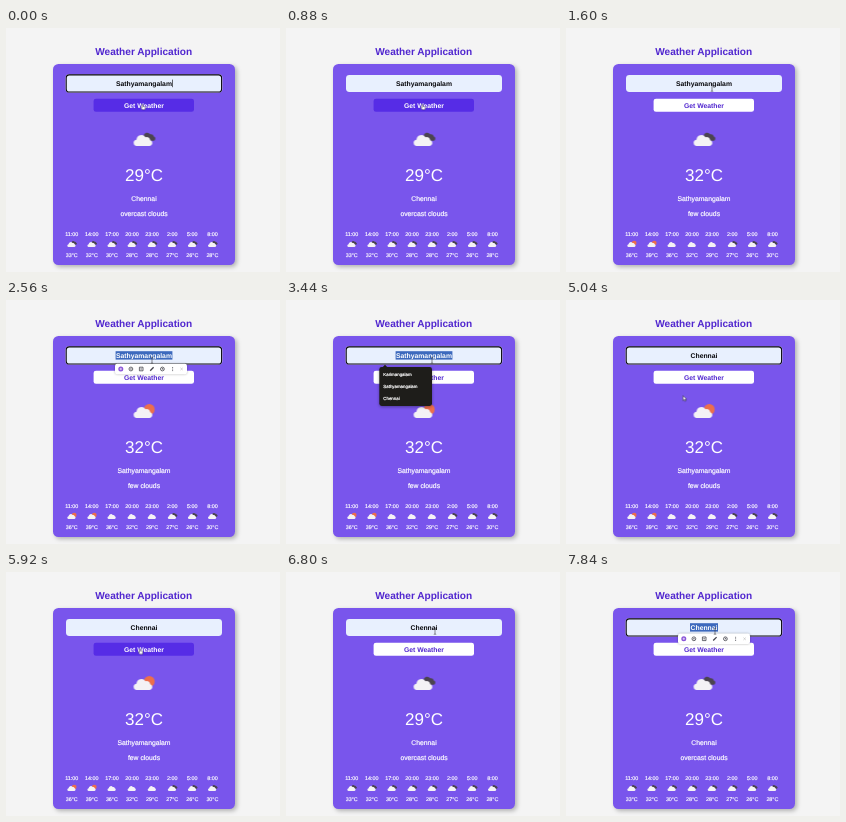
An HTML page for the animation above (8000 ms loop, 274x244 px).

```html
<!DOCTYPE html>
<html lang="en">
<head>
<meta charset="utf-8">
<title>Weather Application</title>
<style>
html, body { margin: 0; width: 100%; height: 100%; overflow: hidden; background: #f4f4f4; }
svg { display: block; width: 274px; height: 244px; }
text { font-family: "Liberation Sans", Arial, sans-serif; text-rendering: geometricPrecision; }
.mid { text-anchor: middle; }
.bold { font-weight: bold; }
.card { fill: #7955ec; filter: drop-shadow(2.5px 2.5px 2.2px rgba(0,0,0,.27)); }
.field { fill: #e8f0fe; }
.info, .hour, .items { fill: #fff; stroke: #fff; stroke-width: .2; }
.info { font-size: 6.8px; }
.hour { font-size: 5.4px; }
.items { font-size: 4.4px; }

/* Timeline: 1% = 80ms */
.step { animation: 8s step-end infinite; }
.ring { animation-name: ring; }
.caret { animation-name: caret; }
.blank { animation-name: blank; }
.first { animation-name: first; }
.second { animation-name: second; }
.hint-a { animation-name: hintA; }
.hint-b { animation-name: hintB; }
.pick-a { animation-name: pickA; }
.pick-b { animation-name: pickB; }
.bar-a { animation-name: barA; }
.bar-b { animation-name: barB; }
.menu { animation-name: menu; }
.row { animation-name: row; }
.chennai { animation-name: chennai; }
.sathy { animation-name: sathy; }
.dark { animation-name: dark; }
.sunny { animation-name: sunny; }
.hand { animation-name: hand; }
.beam { animation-name: beam; }
.arrow { animation-name: arrow; }
.btn { animation: btn 8s linear infinite; }
.label { animation: label 8s linear infinite; }
.cursor { animation: move 8s ease-in-out infinite; }

@keyframes ring { 0% {opacity:1} 4% {opacity:0} 25% {opacity:1} 69% {opacity:0} 88%, 100% {opacity:1} }
@keyframes caret { 0% {opacity:1} 4%, 100% {opacity:0} }
@keyframes blank { 0% {opacity:0} 45.5% {opacity:1} 50%, 100% {opacity:0} }
@keyframes first { 0% {opacity:1} 45.5%, 100% {opacity:0} }
@keyframes second { 0% {opacity:0} 58.5%, 100% {opacity:1} }
@keyframes hintA { 0% {opacity:0} 50% {opacity:1} 56%, 100% {opacity:0} }
@keyframes hintB { 0% {opacity:0} 56% {opacity:1} 58.5%, 100% {opacity:0} }
@keyframes pickA { 0% {opacity:0} 28% {opacity:1} 45.5%, 100% {opacity:0} }
@keyframes pickB { 0% {opacity:0} 90%, 100% {opacity:1} }
@keyframes barA { 0% {opacity:0} 30.5% {opacity:1} 41%, 100% {opacity:0} }
@keyframes barB { 0% {opacity:0} 93%, 100% {opacity:1} }
@keyframes menu { 0% {opacity:0} 43% {opacity:1} 58.5%, 100% {opacity:0} }
@keyframes row { 0% {opacity:0} 50% {opacity:1; transform:none} 56%, 100% {opacity:1; transform:translateY(12px)} }
@keyframes chennai { 0% {opacity:1} 12.5% {opacity:0} 74.5%, 100% {opacity:1} }
@keyframes sathy { 0% {opacity:0} 12.5% {opacity:1} 74.5%, 100% {opacity:0} }
@keyframes dark { 0% {opacity:1} 21% {opacity:0} 76%, 100% {opacity:1} }
@keyframes sunny { 0% {opacity:0} 21% {opacity:1} 76%, 100% {opacity:0} }
@keyframes hand { 0% {opacity:1} 17.5% {opacity:0} 50% {opacity:1} 58.5% {opacity:0} 67.5% {opacity:1} 81%, 100% {opacity:0} }
@keyframes beam { 0% {opacity:0} 18.5% {opacity:1} 47% {opacity:0} 83%, 100% {opacity:1} }
@keyframes arrow { 0% {opacity:0} 17.5% {opacity:1} 18.5% {opacity:0} 47% {opacity:1} 50% {opacity:0} 58.5% {opacity:1} 67.5% {opacity:0} 81% {opacity:1} 83%, 100% {opacity:0} }
@keyframes btn { 0%, 16.3% {fill:#562ce6} 20%, 67.3% {fill:#fff} 71%, 79.8% {fill:#562ce6} 83.6%, 100% {fill:#fff} }
@keyframes label { 0%, 16.3% {fill:#fff} 20%, 67.3% {fill:#5127cf} 71%, 79.8% {fill:#fff} 83.6%, 100% {fill:#5127cf} }
@keyframes move {
  0%, 15% {transform:translate(136.5px,76.5px)}
  19.5%, 45.5% {transform:translate(146px,60px)}
  50%, 54% {transform:translate(126.5px,83.5px)}
  57.5%, 65.5% {transform:translate(117px,96.5px)}
  68.5%, 79% {transform:translate(134px,77px)}
  85%, 100% {transform:translate(149px,59px)}
}
</style>
</head>
<body>
<svg viewBox="0 0 274 244">
  <defs>
    <path id="puff" d="M3.6 15A3.2 3.2 0 0 1 4 8.7A5 5 0 0 1 13 6.2A4.2 4.2 0 0 1 17.8 9.2A3 3 0 0 1 17.4 15Z"/>
    <g id="cloud"><use href="#puff" fill="#f4f2f5"/></g>
    <g id="overcast">
      <use href="#puff" fill="#4b4450" transform="translate(8 -1.4) scale(.75)"/>
      <use href="#cloud"/>
    </g>
    <g id="sun">
      <circle cx="16.8" cy="6.4" r="5.4" fill="#ec6e4c"/>
      <use href="#cloud"/>
    </g>
    <g id="bar">
      <rect width="72" height="10.4" rx="2.2" fill="#fff" style="filter:drop-shadow(0 .7px 1px rgba(0,0,0,.3))"/>
      <circle cx="5.8" cy="5.2" r="2.5" fill="#8a55d8"/>
      <path d="M4.6 5.2h2.4M5.8 4v2.4" stroke="#fff" stroke-width=".6"/>
      <g fill="none" stroke="#45454c" stroke-width=".8">
        <circle cx="15.9" cy="5.2" r="1.9"/><path d="M15 5.2h1.8"/>
        <path d="M24.4 3.4h3.6v3.6h-3.6zM25.3 5.2h1.8"/>
        <path d="M35.2 6.9l3.4-3.4" stroke-width="1.3"/>
        <circle cx="47.4" cy="5.2" r="1.9"/><path d="M47.4 4.2v1.2h1"/>
        <path d="M57.6 3.2v.9M57.6 4.8v.9M57.6 6.4v.9"/>
        <path d="M65.4 4l2.4 2.4M67.8 4l-2.4 2.4" stroke="#aaa" stroke-width=".5"/>
      </g>
    </g>
  </defs>

  <rect width="274" height="244" fill="#f4f4f4"/>
  <text class="mid bold" x="137.7" y="27.3" font-size="10.1" fill="#5127cf">Weather Application</text>
  <rect class="card" x="47" y="36" width="182" height="201" rx="5.5"/>

  <rect class="field" x="60" y="47" width="156" height="17" rx="3.4"/>
  <rect class="step blank" x="60" y="47" width="156" height="17" rx="3.4" fill="#fff"/>
  <g class="step ring" fill="none">
    <rect x="59.7" y="46.4" width="156.4" height="18.1" rx="3.4" stroke="#fff" stroke-width=".6"/>
    <rect x="60.2" y="46.9" width="155.4" height="17.1" rx="3.1" stroke="#08080c" stroke-width="1.1"/>
  </g>
  <g class="mid bold" font-size="6.8" fill="#08080c">
    <text class="step first" x="138" y="57.8">Sathyamangalam</text>
    <text class="step second" x="138" y="57.8">Chennai</text>
  </g>
  <path class="step caret" d="M166.4 51.6v7.6" stroke="#111" stroke-width=".7"/>
  <g class="mid" font-size="4.7" fill="#08080c" stroke="#08080c" stroke-width=".15">
    <text class="step hint-a" x="138" y="57.6">Sathyamangalam</text>
    <text class="step hint-b" x="138" y="57.6">Chennai</text>
  </g>
  <g class="mid bold" font-size="6.8">
    <g class="step pick-a">
      <rect x="109.6" y="51.2" width="56.8" height="8.4" fill="#3c69bd"/>
      <text x="138" y="57.8" fill="#fff">Sathyamangalam</text>
    </g>
    <g class="step pick-b">
      <rect x="124" y="51.2" width="28" height="8.4" fill="#3c69bd"/>
      <text x="138" y="57.8" fill="#fff">Chennai</text>
    </g>
  </g>

  <rect class="btn" x="87.6" y="70.7" width="100.4" height="13.1" rx="2.4"/>
  <text class="label mid bold" x="138" y="79.5" font-size="6.8">Get Weather</text>

  <use class="step dark" href="#overcast" x="126.5" y="103"/>
  <use class="step sunny" href="#sun" x="126.5" y="103"/>
  <g id="reports"></g>

  <g class="step menu">
    <path d="M95.6 68.2l3.4-3.4 3.4 3.4z" fill="#1e1d1a"/>
    <rect x="93.3" y="67" width="52.7" height="39" rx="2.4" fill="#1e1d1a" style="filter:drop-shadow(0 1px 1.5px rgba(0,0,0,.35))"/>
    <g class="step row">
      <rect x="93.3" y="80.4" width="52.7" height="11.8" fill="#373633"/>
      <path d="M137.6 85l2.6 2.6M140.2 85l-2.6 2.6" stroke="#ddd" stroke-width=".6"/>
    </g>
    <g class="items">
      <text x="97.3" y="75.8">Karimangalam</text>
      <text x="97.3" y="87.8">Sathyamangalam</text>
      <text x="97.3" y="99.8">Chennai</text>
    </g>
  </g>

  <g class="step bar-a"><use href="#bar" x="109" y="63.8"/></g>
  <g class="step bar-b"><use href="#bar" x="112" y="61.6"/></g>

  <g class="cursor">
    <g transform="scale(.78)">
      <path class="step hand" d="M-.7 0q.7-.8 1.4 0v2.4l2.4.6q.7.2.6 1l-.6 2.6h-3.4l-2-2.6q.2-.9 1.6 0z" fill="#fff" stroke="#111" stroke-width=".5"/>
      <path class="step arrow" d="M0-1v6.2l1.5-1.3 1 2.2 1-.4-1-2.2h2z" fill="#fff" stroke="#111" stroke-width=".6"/>
    </g>
    <path class="step beam" d="M-1.2-3q1.2 0 1.2.7v5q0 .7-1.2.7M1.2-3q-1.2 0-1.2.7M0 2.7q0 .7 1.2.7" fill="none" stroke="#3a3a3e" stroke-width=".6"/>
  </g>
</svg>
<script>
const hours = ['11:00', '14:00', '17:00', '20:00', '23:00', '2:00', '5:00', '8:00'];
const many = (name, n) => Array(n).fill(name);
const reports = [
  { id: 'chennai', city: 'Chennai', now: 29, sky: 'overcast clouds',
    temps: [33, 32, 30, 28, 28, 27, 26, 28], icons: many('overcast', 8) },
  { id: 'sathy', city: 'Sathyamangalam', now: 32, sky: 'few clouds',
    temps: [36, 39, 36, 32, 29, 27, 26, 30],
    icons: [...many('sun', 2), ...many('cloud', 3), ...many('overcast', 3)] }
];
const colX = i => 65.7 + i * 20.1;
const label = (cls, x, y, str) => `<text class="mid ${cls}" x="${x}" y="${y}">${str}</text>`;

const times = hours.map((h, i) => label('hour', colX(i), 207.8, h)).join('');
const panel = r => `<g class="step ${r.id}">
  <text class="mid" x="138" y="153" font-size="17" fill="#fff">${r.now}°C</text>
  ${label('info', 138, 173.2, r.city)}
  ${label('info', 138, 187.6, r.sky)}
  ${r.temps.map((t, i) => label('hour', colX(i), 228.9, t + '°C') +
    `<use href="#${r.icons[i]}" transform="translate(${colX(i) - 4.9} 212.3) scale(.44)"/>`).join('')}
</g>`;
document.getElementById('reports').innerHTML = times + reports.map(panel).join('');
</script>
</body>
</html>
```
